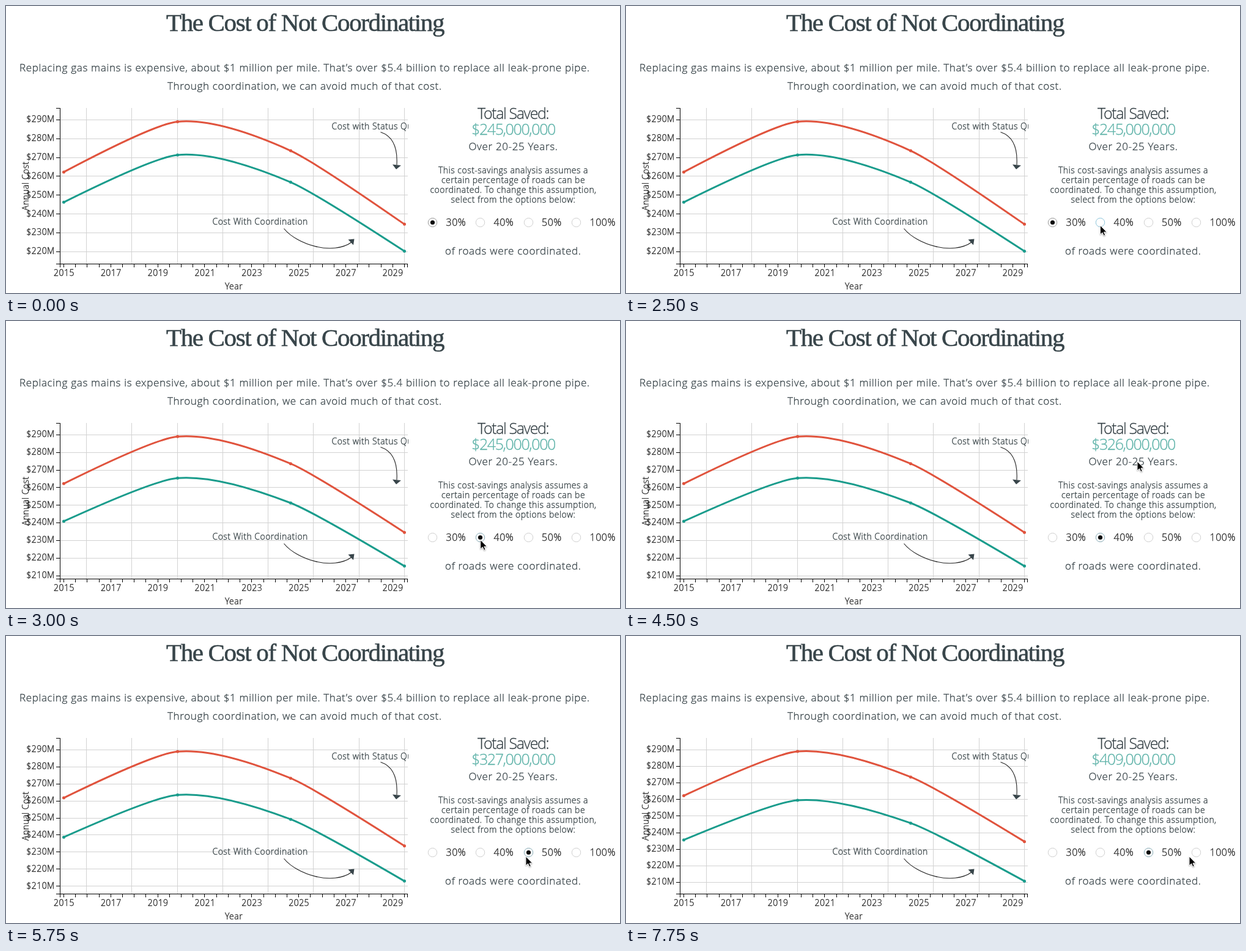
Write an HTML page that moves like this. It is 1004 by 470 pixels and loops after 8000 ms.

```html
<!DOCTYPE html>
<html lang="en">
<head>
<meta charset="utf-8">
<title>The Cost of Not Coordinating</title>
<style>
  html, body { margin: 0; width: 100%; height: 100%; overflow: hidden; background: #fff; }
  svg { display: block; width: 1004px; height: 470px; }
  text {
    --ink: #1c1c1c;
    font: 300 14px "Open Sans", sans-serif; letter-spacing: .48px;
    fill: var(--ink); stroke: var(--ink); stroke-width: .3px;
  }
  .title { --ink: #38454a; font: 400 41px "Liberation Serif", serif; letter-spacing: -1.35px; stroke-width: .6px; }
  .body { --ink: #333f44; font-size: 17px; letter-spacing: .66px; }
  .big { --ink: #333f44; font-size: 25px; letter-spacing: -1.38px; }
  .money { --ink: #5fb3a9; }
  .option { font-size: 16px; letter-spacing: .5px; }
  .note { --ink: #2c383c; }
  .mid { text-anchor: middle; }
  .end { text-anchor: end; }
  .grid, .axis { fill: none; shape-rendering: crispEdges; }
  .grid { stroke: #d2d2d2; }
  .axis { stroke: #000; }
  .curve { fill: none; stroke-width: 3; }
  .arrow { fill: none; stroke: #222; stroke-width: 1.1; }
  .head { fill: #38454a; }
  .ring { fill: #fff; stroke: #cfcfcf; }
  .on .ring { stroke: #999; }
  .hot .ring { stroke: #8cc4da; }
  .hot.on .ring { stroke: #86aab5; }
  .dot { fill: #0c0c0c; visibility: hidden; }
  .on .dot { visibility: visible; }
  #cursor { filter: drop-shadow(0 1px 1px rgba(0, 0, 0, .35)); }
</style>
</head>
<body>
<svg viewBox="0 0 1004 470">
  <defs><clipPath id="plot"><rect x="0" y="160" width="658" height="310"/></clipPath></defs>

  <text class="title" x="262" y="40.5">The Cost of Not Coordinating</text>
  <text class="body mid" x="488.3" y="107">Replacing gas mains is expensive, about $1 million per mile. That’s over $5.4 billion to replace all leak-prone pipe.</text>
  <text class="body mid" x="488.3" y="137">Through coordination, we can avoid much of that cost.</text>

  <g id="grid"></g>
  <g id="xaxis"><path class="axis" d="M88.5 428V422.5H656.5V428M82 167.5H88.5V422.5H82"/></g>
  <g id="yaxis"></g>
  <text x="372.5" y="464" class="mid">Year</text>
  <text transform="translate(36.5 335) rotate(-90)">Annual Cost</text>
  <g id="curves"></g>

  <g clip-path="url(#plot)">
    <text class="note" x="532.5" y="201.5">Cost with Status Quo</text>
  </g>
  <path class="arrow" d="M612.5 206.5Q641.5 216 639 260"/>
  <path class="head" d="M632 259.5L646 261L638 267.5Z"/>
  <text class="note" x="337.5" y="357.5">Cost With Coordination</text>
  <path class="arrow" d="M454.5 364.5C476 391 535 409 565.5 386.5"/>
  <path class="head" d="M559.5 382.5L569.5 381.5L568 391.5Z"/>

  <text class="big mid" x="829" y="184.5">Total Saved:</text>
  <text class="big money mid" x="829.5" y="211" id="total"></text>
  <text class="body mid" x="829.5" y="236">Over 20-25 Years.</text>
  <g class="mid">
    <text class="note" x="829.5" y="274">This cost-savings analysis assumes a</text>
    <text class="note" x="829.5" y="290">certain percentage of roads can be</text>
    <text class="note" x="829.5" y="306">coordinated. To change this assumption,</text>
    <text class="note" x="829.5" y="322">select from the options below:</text>
  </g>
  <g id="options"></g>
  <text class="body mid" x="829.3" y="407">of roads were coordinated.</text>

  <path id="cursor" fill="#000" stroke="#fff" stroke-width="1"
        d="M0 0V15L3.5 11.8L6 17L8.3 16L6 11H10.7Z"/>
</svg>
<script>
const LOOP = 8000, STEP = 250;
const $ = id => document.getElementById(id);

function add(parent, tag, attrs, text) {
  const el = document.createElementNS('http://www.w3.org/2000/svg', tag);
  for (const key in attrs) el.setAttribute(key, attrs[key]);
  if (text) el.textContent = text;
  parent.appendChild(el);
  return el;
}

const clamp = v => Math.max(0, Math.min(1, v));
const cubic = p => p < .5 ? 4 * p ** 3 : 1 - 4 * (1 - p) ** 3;
const sine = p => (1 - Math.cos(Math.PI * p)) / 2;
const ramp = (t, start, length, ease) => ease(clamp((t - start) / length));
const mix = (a, b, p) => a + (b - a) * p;

// Value at stage s between three states
const pick = (list, s) => s < 1 ? mix(list[0], list[1], s) : mix(list[1], list[2], s - 1);

const SHARES = [.3, .4, .5];           // coordinated roads
const SCALES = [3.086, 2.885, 2.712];  // pixels per million
const SAVING = .2036;
const PX = [94.5, 280.5, 465.5, 651.5];
const STATUS_QUO = [262.3, 289, 273.6, 234.6];
const toY = (value, scale) => 186.4 + (290 - value) * scale;

// Fixed grid and x axis
for (let i = 0; i < 8; i++) {
  const x = Math.floor(131.6 + i * 74.27) + .5;
  add($('grid'), 'path', { class: 'grid', d: `M${x} 167V422` });
}
for (let i = 0; i < 30; i++) {
  const x = 94.5 + i * 19.207;
  add($('xaxis'), 'path', { class: 'axis', d: `M${Math.floor(x) + .5} 422V428` });
  if (i % 4 === 0) add($('xaxis'), 'text', { x: x + .5, y: 442, class: 'mid' }, String(2015 + i / 2));
}

const rows = [];
for (let value = 290; value >= 210; value -= 10) {
  rows.push({
    value,
    line: add($('grid'), 'path', { class: 'grid', d: 'M89 0H657' }),
    tick: add($('yaxis'), 'path', { class: 'axis', d: 'M82 0H88' }),
    label: add($('yaxis'), 'text', { class: 'end', x: 79.7, y: 3.8 }, `$${value}M`)
  });
}

function makeCurve(color) {
  const path = add($('curves'), 'path', { class: 'curve', stroke: color });
  const dots = PX.map(x => add($('curves'), 'circle', { cx: x, r: 2.5, fill: color }));
  return { path, dots };
}
const red = makeCurve('#e0533d');
const teal = makeCurve('#1a9c8c');

// Cardinal spline, tension .7, with quadratic end pieces
function drawCurve(curve, y) {
  const slope = i => [.15 * (PX[i + 1] - PX[i - 1]), .15 * (y[i + 1] - y[i - 1])];
  const at = (i, k) => {
    const [dx, dy] = slope(i);
    return `${PX[i] + k * dx} ${y[i] + k * dy}`;
  };
  const end = i => `${PX[i]} ${y[i]}`;
  curve.path.setAttribute('d',
    `M${end(0)}Q${at(1, -2 / 3)} ${end(1)}C${at(1, 1)} ${at(2, -1)} ${end(2)}Q${at(2, 2 / 3)} ${end(3)}`);
  curve.dots.forEach((dot, i) => dot.setAttribute('cy', y[i]));
}

const radios = [[697.5, 719.5, '30%'], [775.5, 797.5, '40%'], [854.5, 876, '50%'], [932.5, 954.5, '100%']]
  .map(([cx, x, label]) => {
    const group = add($('options'), 'g', {});
    add(group, 'circle', { class: 'ring', cx, cy: 354.5, r: 7.2 });
    add(group, 'circle', { class: 'dot', cx, cy: 354.5, r: 3.6 });
    add(group, 'text', { class: 'option', x, y: 360 }, label);
    return group;
  });

// Cursor stops: time, x, y
const STOPS = [
  [750, 730, 295], [1000, 700, 350], [1250, 698, 361], [1500, 730, 363], [1750, 766, 363],
  [2000, 775, 360], [3250, 776, 358], [3500, 790, 322], [3750, 815, 262], [4000, 832, 234],
  [4250, 836, 230], [4500, 836, 230], [4750, 838, 250], [5000, 845, 310], [5250, 850, 358],
  [5500, 850, 361], [5750, 850, 361], [6000, 860, 361], [6250, 893, 361], [6500, 915, 361],
  [6750, 921, 361], [LOOP, 921, 361]
];

function cursorAt(t) {
  const i = STOPS.findIndex((s, n) => n > 0 && t < s[0]);
  const a = STOPS[i - 1], b = STOPS[i];
  const p = (t - a[0]) / (b[0] - a[0]);
  return [mix(a[1], b[1], p), mix(a[2], b[2], p)];
}

function draw(t) {
  const axisStage = ramp(t, 2570, 350, cubic) + ramp(t, 5570, 350, cubic);
  const lineStage = ramp(t, 2610, 350, cubic) + ramp(t, 5610, 350, cubic);

  const scale = pick(SCALES, axisStage);
  for (const row of rows) {
    const y = toY(row.value, scale);
    const snapped = `translate(0 ${Math.floor(y) + .5})`;
    row.line.setAttribute('transform', snapped);
    row.tick.setAttribute('transform', snapped);
    row.label.setAttribute('transform', `translate(0 ${y})`);
    for (const part of [row.line, row.tick, row.label]) {
      part.setAttribute('visibility', y < 422 ? 'visible' : 'hidden');
    }
  }

  const heights = saving => STATUS_QUO.map(cost =>
    pick(SCALES.map((s, n) => toY(cost * (1 - saving * SHARES[n]), s)), lineStage));
  drawCurve(red, heights(0));
  drawCurve(teal, heights(SAVING));

  const saved = Math.round(245 + 82 * (ramp(t, 3000, 1600, sine) + ramp(t, 6170, 1600, sine)));
  $('total').textContent = `$${saved},000,000`;

  const chosen = t < 2750 ? 0 : t < 5500 ? 1 : 2;
  const hot = t < 2000 ? -1 : t < 5250 ? 1 : 2;
  radios.forEach((group, i) => {
    group.setAttribute('class', (i === chosen ? 'on ' : '') + (i === hot ? 'hot' : ''));
  });

  const shown = t >= STOPS[0][0];
  $('cursor').setAttribute('visibility', shown ? 'visible' : 'hidden');
  if (shown) $('cursor').setAttribute('transform', `translate(${cursorAt(t).join(' ')})`);
}

function tick() {
  const t = performance.now() % LOOP;
  draw(Math.floor(t / STEP) * STEP);
  requestAnimationFrame(tick);
}
tick();
</script>
</body>
</html>
```
